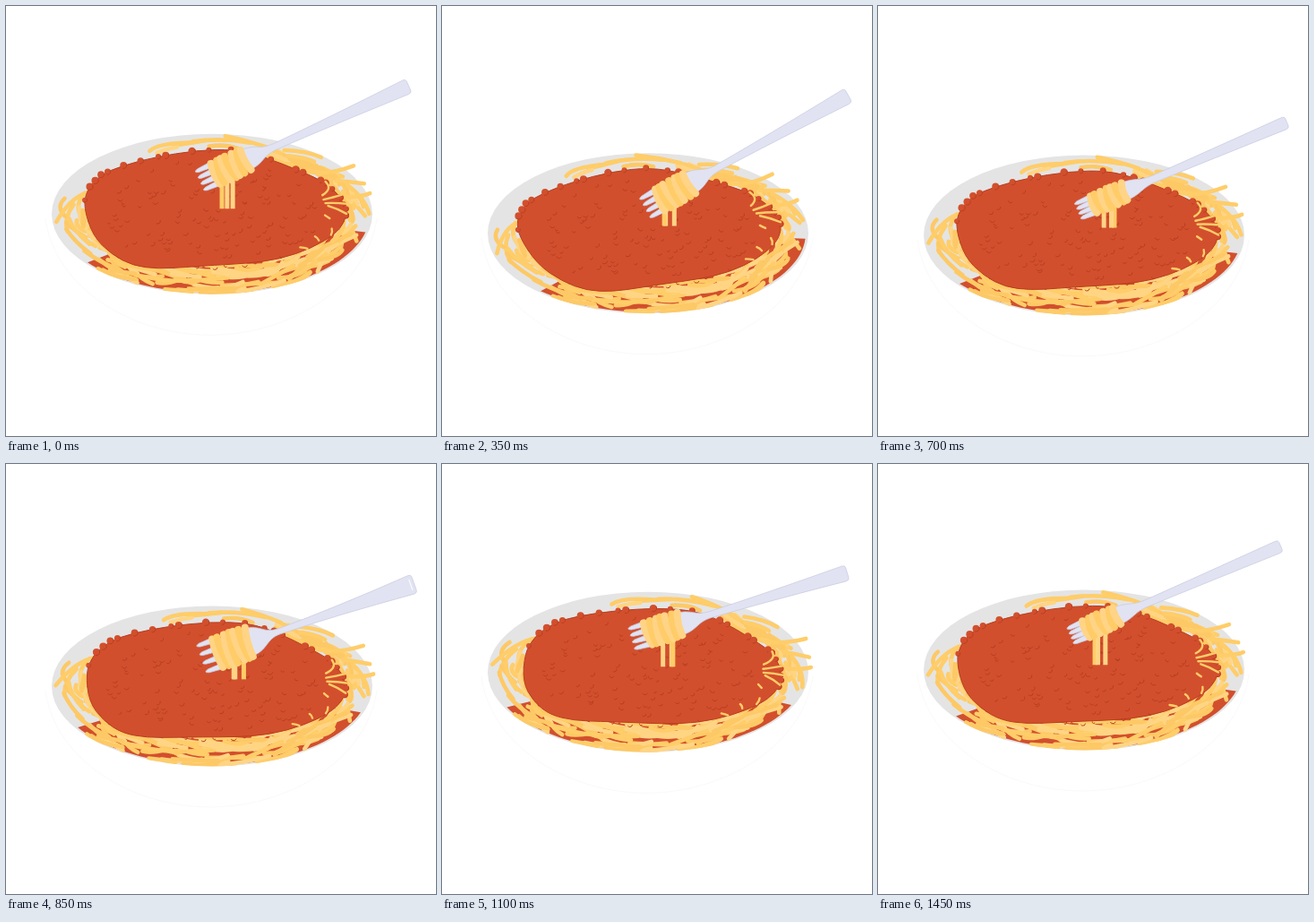
These frames come from a looping animation (480 px wide and 480 px high, 1500 ms). An HTML page with a canvas:

```html
<!DOCTYPE html>
<html lang="en">
<head>
<meta charset="utf-8">
<title>Spaghetti</title>
<style>
html, body { margin: 0; width: 100%; height: 100%; overflow: hidden; background: #fff; }
canvas { display: block; width: 480px; height: 480px; }
</style>
</head>
<body>
<canvas id="stage" width="480" height="480"></canvas>
<script>
const ctx = document.getElementById('stage').getContext('2d');
const LOOP = 1500, STEP = 50, TAU = Math.PI * 2;
const CX = 230, CY = 232, RIM = 179, FLAT = 0.5;
const COLOR = {
  sauce: '#d24f2d', sauceEdge: '#b83e20', dish: '#e4e4e4',
  pasta: ['#ffcd69', '#ffd584', '#fdc966'], twirl: ['#ffd486', '#ffcc68'],
  steel: '#e1e3f2', steelEdge: '#c9cce2'
};

function seeded(seed) {
  return () => {
    seed = (seed * 1664525 + 1013904223) >>> 0;
    return seed / 4294967296;
  };
}
const rnd = seeded(41);
const between = (a, b) => a + (b - a) * rnd();
const wave = (t, peak) => Math.cos(TAU * (t - peak) / LOOP);
const polar = (r, a) => [r * Math.cos(a), r * Math.sin(a)];

// Everything in the dish is laid out on a flat disc seen at an angle.
const SAUCE = [
  [-143, -18], [-139, -56], [-123, -90], [-98, -110], [-62, -128], [-14, -143],
  [28, -144], [62, -126], [98, -96], [126, -71], [142, -42], [150, -8], [148, 20],
  [136, 48], [110, 78], [74, 102], [36, 111], [0, 114], [-32, 118], [-62, 121],
  [-90, 114], [-114, 88], [-134, 46]
];

function strand(a, r, span, drift) {
  return {
    from: polar(r, a),
    mid: polar(Math.min(r + drift / 2 + between(-4, 9), 183), a + span / 2),
    to: polar(Math.min(r + drift, 176), a + span),
    color: COLOR.pasta[Math.floor(rnd() * 3)]
  };
}
function strands(count, a0, a1, r0, r1, drift) {
  return Array.from({ length: count }, () =>
    strand(between(a0, a1), between(r0, r1), between(0.14, 0.4), between(-drift, drift)));
}
const line = (from, mid, to) => ({ from, mid, to, color: COLOR.pasta[0] });

const noodles = [
  ...strands(4, 2.8, 3.3, 146, 166, 16),
  ...strands(12, 2.55, 3.05, 136, 150, 8),
  ...strands(4, 4.2, 4.8, 148, 164, 14),
  ...strands(42, -1.2, -0.25, 132, 166, 18),
  ...strands(36, -0.4, 0.7, 132, 168, 20),
  ...strands(92, 0.5, 2.25, 108, 176, 18),
  ...strands(12, 2.1, 2.6, 132, 164, 16)
];
const strays = [
  line([108, -94], [128, -82], [160, -105]),
  line([140, -72], [157, -69], [171, -65]),
  line([136, -36], [165, -33], [177, -43]),
  line([18, -174], [42, -164], [64, -148]),
  line([-67, -142], [-57, -160], [-20, -160]),
  line([-174, 14], [-157, -42], [-136, -52]),
  line([-160, 6], [-156, 34], [-138, 64])
];
const streaks = [
  line([125, -30], [135, -34], [148, -42]),
  line([127, -22], [138, -23], [152, -20]),
  line([124, -40], [136, -54], [128, -70]),
  line([130, -16], [140, -10], [150, 2]),
  line([126, 5], [128, 8], [131, 12]),
  line([114, 52], [117, 55], [118, 61]),
  line([97, 76], [102, 77], [105, 79]),
  line([133, 35], [134, 42], [132, 49])
];
const crumbs = Array.from({ length: 135 }, () => ({
  at: polar(122 * Math.sqrt(rnd()), rnd() * TAU), size: between(1.6, 3.2), turn: between(-0.4, 1)
}));
const lumps = Array.from({ length: 24 }, (_, i) => {
  const spot = 0.6 + i * 0.48 + between(-0.2, 0.2), k = Math.floor(spot), f = spot - k;
  const mix = n => SAUCE[k][n] * (1 - f) + SAUCE[k + 1][n] * f;
  return { at: [mix(0), mix(1)], size: between(3, 4.2) };
});

function strokeNow(color, width) {
  ctx.strokeStyle = color;
  ctx.lineWidth = width;
  ctx.stroke();
}

function drawDish(t) {
  const dy = 11 - 16 * wave(t, 1300);
  const spin = -0.18 * wave(t, 350);
  const cos = Math.cos(spin), sin = Math.sin(spin);
  const place = ([x, y]) => [CX + x * cos - y * sin, CY + dy + FLAT * (x * sin + y * cos)];
  const drawStrand = (s, width) => {
    ctx.beginPath();
    ctx.moveTo(...place(s.from));
    ctx.quadraticCurveTo(...place(s.mid), ...place(s.to));
    strokeNow(s.color, width);
  };
  const y = CY + dy;

  ctx.beginPath();
  ctx.moveTo(44, y + 5);
  ctx.bezierCurveTo(54, y + 82, 140, y + 135, 228, y + 135);
  ctx.bezierCurveTo(316, y + 135, 403, y + 82, 414, y + 5);
  strokeNow('#f8f8f8', 0.8);

  ctx.beginPath();
  ctx.ellipse(CX, y, RIM, RIM * FLAT, 0, 0, TAU);
  ctx.fillStyle = COLOR.dish;
  ctx.fill();

  ctx.save();
  ctx.beginPath();
  ctx.rect(0, 0, 480, y);
  ctx.ellipse(CX, y, RIM, RIM * FLAT, 0, 0, Math.PI);
  ctx.clip();

  ctx.beginPath();
  ctx.moveTo(CX, y);
  for (let a = 0.25; a <= 2.5; a += 0.05) ctx.lineTo(...place(polar(176, a)));
  ctx.closePath();
  ctx.fillStyle = COLOR.sauce;
  ctx.fill();

  noodles.forEach(s => drawStrand(s, 4.6));
  strays.forEach(s => drawStrand(s, 4.6));
  ctx.restore();

  drawSauce(place);
  streaks.forEach(s => drawStrand(s, 2.4));
  return dy;
}

function drawSauce(place) {
  const pts = SAUCE.map(place);
  const middle = (p, q) => [(p[0] + q[0]) / 2, (p[1] + q[1]) / 2];
  ctx.beginPath();
  ctx.moveTo(...middle(pts[pts.length - 1], pts[0]));
  pts.forEach((p, i) => ctx.quadraticCurveTo(...p, ...middle(p, pts[(i + 1) % pts.length])));
  ctx.fillStyle = COLOR.sauce;
  ctx.fill();
  strokeNow(COLOR.sauceEdge, 1);

  lumps.forEach(({ at, size }) => {
    const [x, y] = place(at);
    ctx.beginPath();
    ctx.arc(x, y, size, 0, TAU);
    ctx.fillStyle = COLOR.sauce;
    ctx.fill();
    ctx.beginPath();
    ctx.arc(x, y, size - 0.5, -0.4, 1.8);
    strokeNow(COLOR.sauceEdge, 1);
  });
  crumbs.forEach(({ at, size, turn }) => {
    const [x, y] = place(at);
    ctx.beginPath();
    ctx.arc(x, y, size, turn, turn + 2.2);
    strokeNow(COLOR.sauceEdge, 1);
  });
}

function drawFork(t, dy) {
  const bx = 254 + 7 * wave(t, 480), by = 195.5 + 21 * wave(t, 585);
  const ex = 452 + 3.5 * wave(t, 680), ey = 111 - 23 * wave(t, 90);
  const face = Math.cos(Math.PI * (t - 180) / 750) ** 2;
  const length = Math.hypot(ex - bx, ey - by);

  const hangX = 253 + 6 * wave(t, 750);
  ctx.lineCap = 'butt';
  for (let k = 0; k < 3; k++) {
    const x = hangX + 7 * Math.cos(TAU * (t / LOOP + k / 3) + 0.5);
    ctx.beginPath();
    ctx.moveTo(x, by + 6);
    ctx.lineTo(x, 226 + 0.9 * dy);
    strokeNow(COLOR.twirl[k % 2], 5);
  }
  ctx.lineCap = 'round';

  ctx.save();
  ctx.translate(bx, by);
  ctx.rotate(Math.atan2(ey - by, ex - bx));

  const tineGap = (10 + 23 * face) / 3;
  for (let i = 0; i < 4; i++) {
    const v = (i - 1.5) * tineGap;
    ctx.beginPath();
    ctx.moveTo(-16, v - 3.4);
    ctx.lineTo(-35, v - 2);
    ctx.quadraticCurveTo(-42, v, -35, v + 2);
    ctx.lineTo(-16, v + 3.4);
    ctx.closePath();
    ctx.fillStyle = COLOR.steel;
    ctx.fill();
    strokeNow(COLOR.steelEdge, 0.7);
  }

  const end = (10 + 13 * face) / 2, neck = (9 - 3 * face) / 2, head = (14 + 20 * face) / 2;
  ctx.beginPath();
  ctx.moveTo(16, -head);
  ctx.bezierCurveTo(36, -head, 36, -neck, 54, -neck);
  ctx.quadraticCurveTo(120, -neck - 1, length - 3, -end);
  ctx.quadraticCurveTo(length + 1, -end, length + 1, -end + 3);
  ctx.lineTo(length + 1, end - 3);
  ctx.quadraticCurveTo(length + 1, end, length - 3, end);
  ctx.quadraticCurveTo(120, neck + 1, 54, neck);
  ctx.bezierCurveTo(36, neck, 36, head, 16, head);
  ctx.closePath();
  ctx.fillStyle = COLOR.steel;
  ctx.fill();
  strokeNow(COLOR.steelEdge, 0.7);

  if (face < 0.25) {
    ctx.beginPath();
    ctx.moveTo(58, neck - 1);
    ctx.quadraticCurveTo(120, neck, length - 3, end - 1.5);
    strokeNow('#cbc0cb', 3);
  }
  if (face > 0.8) {
    ctx.beginPath();
    ctx.moveTo(length - 3, -end + 5);
    ctx.lineTo(length - 3, end - 5);
    strokeNow('#fafaff', 1.2);
  }

  const half = (22 + 24 * face) / 2 - 4;
  for (let i = 0; i < 7; i++) {
    const u = -19 + i * 6.2;
    const sway = 2.5 * Math.sin(TAU * t / LOOP + i * 1.7);
    const edge = half - Math.abs(i - 3) * 0.3;
    ctx.beginPath();
    ctx.moveTo(u + sway * 0.5, -edge);
    ctx.quadraticCurveTo(u - 3, 0, u - sway * 0.5, edge);
    strokeNow(COLOR.twirl[i % 2], 8);
  }
  ctx.restore();
}

function frame(now) {
  const t = Math.floor((now % LOOP) / STEP) * STEP;
  ctx.fillStyle = '#fff';
  ctx.fillRect(0, 0, 480, 480);
  ctx.lineCap = ctx.lineJoin = 'round';
  drawFork(t, drawDish(t));
}

let start = null;
function tick(now) {
  if (start === null) start = now;
  frame(now - start);
  requestAnimationFrame(tick);
}
frame(0);
requestAnimationFrame(tick);
</script>
</body>
</html>
```
